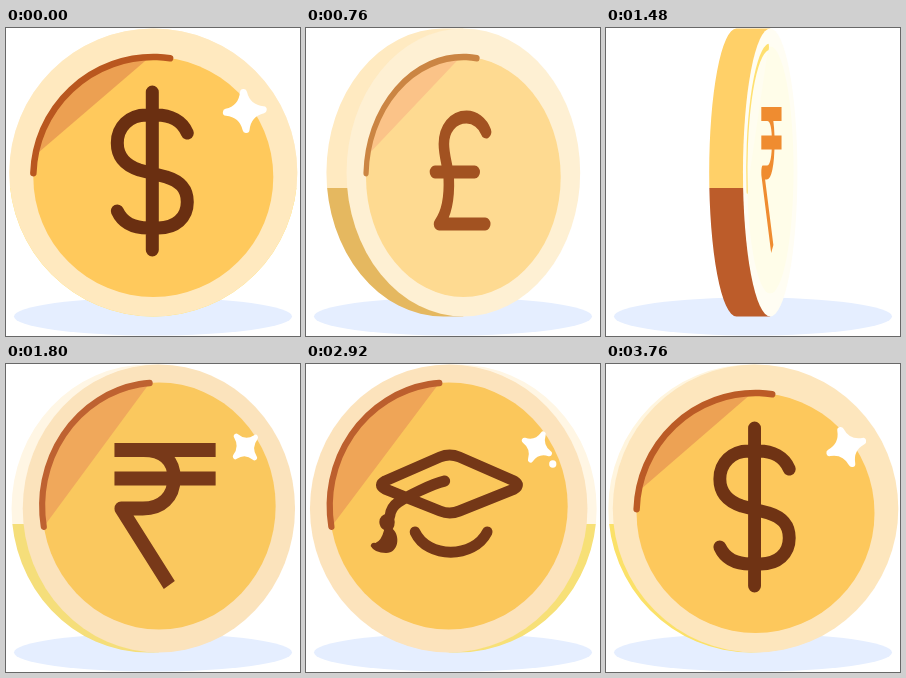
Animation of 294 by 308 pixels, one loop 3800 ms. Source, as an HTML page with a canvas:

```html
<!DOCTYPE html>
<html lang="en">
<head>
<meta charset="utf-8">
<title>Spinning coin</title>
<style>
  html, body { margin: 0; width: 100%; height: 100%; overflow: hidden; background: #fff; }
  canvas { display: block; width: 294px; height: 308px; }
</style>
</head>
<body>
<canvas id="stage"></canvas>
<script>
const W = 294, H = 308, LOOP = 3800, STEP = 40;
const CX = 147.3, CY = 144.5, R = 144, HALF = 17.2, SPLIT = 160;

const canvas = document.getElementById('stage');
const ctx = canvas.getContext('2d');
const dpr = window.devicePixelRatio || 1;
canvas.width = W * dpr;
canvas.height = H * dpr;

// Total turn in degrees over the loop
const TURN = [[0, 0], [400, 75.3], [1160, 220.8], [1800, 341], [2240, 427.8], [2920, 555.5], [3800, 720]];

// Colours for each tilt away from the viewer
const TILT = [0, 18, 41, 68, 76];
const COLORS = {
  rim:    ['#ffe9bf', '#fbe2bb', '#fff4da', '#fff9f0', '#fffdf3'],
  face:   ['#ffc95c', '#fac75b', '#ffe0a1', '#fff5d0', '#fffde9'],
  sign:   ['#6a2f11', '#763818', '#af5924', '#d67d28', '#ef8c30'],
  arc:    ['#b9571f', '#bd6030', '#cf9048', '#ffd75a', '#ffe070'],
  shine:  ['#eca052', '#efa658', '#ffcc96', '#fff9e6', '#fffdf0'],
  top:    ['#fff3d8', '#fff7e6', '#ffe6b6', '#ffd278', '#ffd068'],
  bottom: ['#ffe25a', '#f6e07c', '#e0ac58', '#c06a32', '#bc5c2a']
};

// Star radius, dot radius and dot line width by turn angle
const STAR = [[-32, 0], [-19, 17], [-7.6, 21], [0, 22], [16, 17], [41, 5], [50, 0]];
const DOT = [[8, 0], [16, 2], [41, 5], [52, 6]];
const DOT_LINE = [[8, 0], [16, 4], [41, 1.5], [52, 0]];

const low = { y: 149, r: 120, arc: [-3.11, -1.43], cut: [-2.96, -1.6] };
const high = { y: 142, r: 123.5, arc: [-3.31, -1.65], cut: [-3.31, -1.65] };

const COINS = [
  { ...low, width: 13, cap: 'round', lines: new Path2D(
    'M-1 64V222 M34 105C29 93 17 87 3 87H-7C-24 87-36 99-36 115C-36 130-26 138-14 142' +
    'L13 149C26 153 34 160 34 174C34 190 22 200 5 200H-5C-21 200-31 194-36 183') },
  { ...low, width: 13, cap: 'round', lines: new Path2D(
    'M28 104C24 95 14 89 4 89C-13 89-24 101-24 116C-24 128-19 138-18 150' +
    'C-17 170-21 186-30 196H27 M-35 144H14') },
  { ...high, width: 14, cap: 'butt', lines: new Path2D(
    'M-47 86H60 M-47 114.5H60 M-16 86C6 86 16 98 16 114C16 133 3 144.5-17 144.5H-40L11 221') },
  { ...high, width: 11, cap: 'round', lines: new Path2D(
    'M-66 117L-9 93Q1 89 11 93L68 117Q75 121 68 125L11 147Q1 151-9 147L-66 125Q-74 121-66 117Z ' +
    'M-4 117C-18 120-44 133-52 138Q-60 143-61 152 M-35 168C-22 195 26 195 40 168'),
    blob: new Path2D('M-72 158A8 8 0 0 1-56 158Q-56 162-58 165C-50 172-52 189-65 189' +
      'Q-77 189-81 182Q-80 178-76 179Q-70 177-67 166Q-72 163-72 158Z') }
];

const mix = (a, b, u) => a + (b - a) * u;

function track(points, x) {
  if (x <= points[0][0]) return points[0][1];
  for (let i = 1; i < points.length; i++) {
    const [x0, y0] = points[i - 1], [x1, y1] = points[i];
    if (x <= x1) return mix(y0, y1, (x - x0) / (x1 - x0));
  }
  return points[points.length - 1][1];
}

const channel = (hex, n) => parseInt(hex.slice(1 + n * 2, 3 + n * 2), 16);

function shade(name, tilt) {
  const rgb = [0, 1, 2].map(n =>
    Math.round(track(TILT.map((t, i) => [t, channel(COLORS[name][i], n)]), tilt)));
  return `rgb(${rgb})`;
}

function ellipse(x, y, rx, ry, fill) {
  ctx.beginPath();
  ctx.ellipse(x, y, rx, ry, 0, 0, Math.PI * 2);
  ctx.fillStyle = fill;
  ctx.fill();
}

function drawEdge(front, back, rx, tilt) {
  const body = new Path2D();
  body.ellipse(back, CY, rx, R, 0, 0, Math.PI * 2);
  body.rect(Math.min(front, back), CY - R, Math.abs(front - back), R * 2);
  ctx.save();
  ctx.clip(body);
  ctx.fillStyle = shade('top', tilt);
  ctx.fillRect(0, 0, W, SPLIT);
  ctx.fillStyle = shade('bottom', tilt);
  ctx.fillRect(0, SPLIT, W, H);
  ctx.restore();
}

// Pale light across the upper left of a tilted coin
function drawGlare(front, back, rx, tilt) {
  const body = new Path2D();
  body.ellipse(front, CY, rx, R, 0, 0, Math.PI * 2);
  body.rect(Math.min(front, back), 0, Math.abs(front - back), 40);
  ctx.save();
  ctx.clip(body);
  ctx.globalAlpha = track([[50, 0], [68, 0.6], [80, 0]], tilt);
  ctx.fillStyle = '#fff6e6';
  ctx.beginPath();
  ctx.moveTo(front - rx, 160);
  ctx.lineTo(front + 36, 0);
  ctx.lineTo(front - rx, 0);
  ctx.fill();
  ctx.restore();
}

function drawSparkle(a) {
  const r = track(STAR, a), line = track(DOT_LINE, a);
  ctx.strokeStyle = ctx.fillStyle = '#fff';
  if (r > 0) {
    ctx.save();
    ctx.translate(91.5, 83);
    ctx.rotate((a * 2 - 4) * Math.PI / 180);
    const tip = r * 0.84, dip = r * 0.12;
    ctx.beginPath();
    ctx.moveTo(tip, 0);
    ctx.quadraticCurveTo(dip, dip, 0, tip);
    ctx.quadraticCurveTo(-dip, dip, -tip, 0);
    ctx.quadraticCurveTo(-dip, -dip, 0, -tip);
    ctx.quadraticCurveTo(dip, -dip, tip, 0);
    ctx.closePath();
    ctx.lineWidth = r * 0.32;
    ctx.lineJoin = 'round';
    ctx.fill();
    ctx.stroke();
    ctx.restore();
  }
  if (line > 0) {
    ctx.beginPath();
    ctx.arc(108, 100, track(DOT, a), 0, Math.PI * 2);
    ctx.lineWidth = line;
    ctx.stroke();
  }
}

function drawFace(coin, x, sx, tilt, a) {
  ctx.save();
  ctx.translate(x, 0);
  ctx.scale(sx, 1);
  ellipse(0, CY, R, R, shade('rim', tilt));
  ellipse(0, coin.y, coin.r, coin.r, shade('face', tilt));

  ctx.beginPath();
  ctx.arc(0, coin.y, coin.r, ...coin.cut);
  ctx.fillStyle = shade('shine', tilt);
  ctx.fill();

  ctx.beginPath();
  ctx.arc(0, coin.y, coin.r, ...coin.arc);
  ctx.strokeStyle = shade('arc', tilt);
  ctx.lineWidth = 6.5;
  ctx.lineCap = 'round';
  ctx.stroke();

  ctx.strokeStyle = ctx.fillStyle = shade('sign', tilt);
  ctx.lineWidth = coin.width;
  ctx.lineCap = coin.cap;
  ctx.lineJoin = 'round';
  ctx.stroke(coin.lines);
  if (coin.blob) ctx.fill(coin.blob);

  drawSparkle(a);
  ctx.restore();
}

function draw(time) {
  const turn = track(TURN, time);
  const side = Math.floor((turn + 90) / 180);
  const a = turn - side * 180, tilt = Math.abs(a);
  const rad = a * Math.PI / 180;
  const sx = Math.max(Math.cos(rad), 0.004), shift = HALF * Math.sin(rad);
  const front = CX - shift, back = CX + shift;
  const coin = COINS[side % COINS.length];

  ctx.setTransform(dpr, 0, 0, dpr, 0, 0);
  ctx.fillStyle = '#fff';
  ctx.fillRect(0, 0, W, H);
  ellipse(147, 288.5, 139, 19, '#e5eeff');
  drawEdge(front, back, R * sx, tilt);
  drawFace(coin, front, sx, tilt, a);
  if (coin.y === high.y && a > 50) drawGlare(front, back, R * sx, tilt);
}

const start = performance.now();
function tick() {
  const t = (performance.now() - start) % LOOP;
  draw(Math.floor(t / STEP) * STEP);
  requestAnimationFrame(tick);
}
tick();
</script>
</body>
</html>
```
